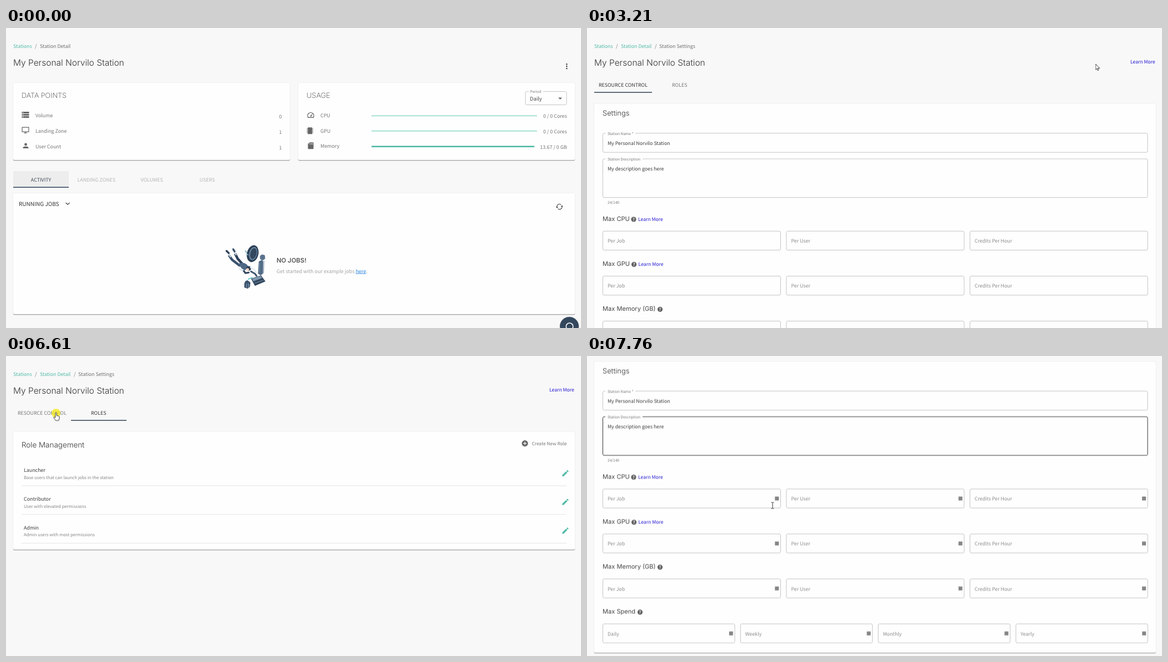
Recreate the animation shown at these times as an HTML page. Size 1035 px wide and 541 px high, loop 8 s.

```html
<!DOCTYPE html>
<html lang="en">
<head>
<meta charset="utf-8">
<title>Station settings</title>
<style>
html, body { margin: 0; width: 100%; height: 100%; overflow: hidden; background: #f8f8f8; }
svg { display: block; }
text { font-family: "Noto Sans CJK JP", "Noto Sans CJK SC", "Source Sans Pro", "Noto Sans", sans-serif; text-rendering: geometricPrecision; white-space: pre; }
text.h { font-family: Inter, "Open Sans", sans-serif; }
.box { fill: none; stroke: #c4c4c4; }
.menu rect:first-child { filter: drop-shadow(0 2px 2px rgba(0,0,0,.3)) drop-shadow(0 1px 4px rgba(0,0,0,.2)); }

#page, #detail, #crumb, #crumb3, #menu, #tools, #settings, #roles, #bar, #tabA, #tabB, #icons, #desc,
#cursor, #arrow, #hand, #beam, #click { animation: 8s step-end infinite; }
#page { animation-name: scroll; }
#detail { animation-name: detail; }
#crumb { animation-name: crumb; }
#crumb3 { animation-name: crumb3; }
#menu { animation-name: menu; }
#tools { animation-name: tools; }
#settings { animation-name: settings; }
#roles { animation-name: roles; }
#bar { animation-name: bar; }
#tabA { animation-name: tabA; }
#tabB { animation-name: tabB; }
#icons { animation-name: icons; }
#desc { animation-name: desc; }
#cursor { animation-name: cursor; }
#arrow { animation-name: arrow; }
#hand { animation-name: hand; }
#beam { animation-name: beam; }
#click { animation-name: click; }

@keyframes scroll {
  0% { transform: none; } 94.125% { transform: translateY(-14.4px); }
  95.125% { transform: translateY(-62px); } 96.06% { transform: translateY(-106px); }
  97%, 100% { transform: translateY(-126.5px); }
}
@keyframes detail { 0% { opacity: 1; } 36.75%, 100% { opacity: 0; } }
@keyframes crumb { 0% { fill: #6f6f6f; } 36.75%, 100% { fill: #52baa6; } }
@keyframes crumb3 { 0% { opacity: 0; } 36.75%, 100% { opacity: 1; } }
@keyframes menu { 0% { opacity: 0; } 20% { opacity: .5; } 21% { opacity: 1; } 36.75% { opacity: .4; } 37.625%, 100% { opacity: 0; } }
@keyframes tools { 0% { opacity: 0; } 40.125%, 100% { opacity: 1; } }
@keyframes settings { 0% { opacity: 0; } 40.125% { opacity: 1; } 64% { opacity: 0; } 84.5%, 100% { opacity: 1; } }
@keyframes roles { 0% { opacity: 0; } 64% { opacity: 1; } 84.5%, 100% { opacity: 0; } }
@keyframes bar {
  0% { transform: none; width: 104px; } 65.375% { transform: translateX(62px); width: 102px; }
  66.75% { transform: translateX(99px); width: 100px; } 68.125% { transform: translateX(104px); width: 100px; }
  85.5% { transform: translateX(42px); width: 102px; } 86.5% { transform: translateX(8px); width: 104px; }
  87.5%, 100% { transform: none; width: 104px; }
}
@keyframes tabA { 0% { fill: #333; } 64% { fill: #757575; } 84.5%, 100% { fill: #333; } }
@keyframes tabB { 0% { fill: #757575; } 64% { fill: #333; } 84.5%, 100% { fill: #757575; } }
@keyframes icons { 0% { opacity: 0; } 49.5% { opacity: 1; } 64% { opacity: 0; } 91.25%, 100% { opacity: 1; } }
@keyframes desc { 0% { stroke: #c4c4c4; } 91.3%, 100% { stroke: #333; } }
@keyframes cursor {
  0% { transform: translate(936px,560px); }
  4.5% { transform: translate(936px,528px); animation-timing-function: steps(5); }
  9.375% { transform: translate(978px,240px); animation-timing-function: steps(5); }
  14.25% { transform: translate(1003px,78px); }
  15.25% { transform: translate(1006px,72px); }
  16.25% { transform: translate(1008px,68px); }
  24.125% { transform: translate(995px,68px); }
  25.125% { transform: translate(977px,68px); }
  26% { transform: translate(945px,67px); }
  27% { transform: translate(925px,65px); }
  28% { transform: translate(915.5px,64px); }
  31.75% { transform: translate(916.5px,65.5px); }
  32.75% { transform: translate(915.5px,64.5px); }
  36.75% { transform: translate(915.5px,65px); }
  42.625% { transform: translate(913px,65px); }
  46.625% { transform: translate(911px,64.5px); }
  48.5% { transform: translate(895px,62px); animation-timing-function: steps(5); }
  53.31% { transform: translate(640px,57px); animation-timing-function: steps(5); }
  58.125% { transform: translate(272px,96px); }
  59.25% { transform: translate(240px,99px); }
  60.2% { transform: translate(205px,101px); }
  61.2% { transform: translate(183px,101px); }
  72.875% { transform: translate(181px,102px); }
  73.875% { transform: translate(180px,102px); }
  75.75% { transform: translate(175px,102px); animation-timing-function: steps(6); }
  81.625% { transform: translate(90px,102.5px); }
  87.5% { transform: translate(90px,102.5px); animation-timing-function: steps(5); }
  92.25%, 100% { transform: translate(334px,269.5px); }
}
@keyframes arrow { 0% { opacity: 0; } 4.5% { opacity: 1; } 15.25% { opacity: 0; } 36.75% { opacity: 1; } 60.2% { opacity: 0; } 88.4% { opacity: 1; } 90.3%, 100% { opacity: 0; } }
@keyframes hand { 0% { opacity: 0; } 15.25% { opacity: 1; } 36.75% { opacity: 0; } 60.2% { opacity: 1; } 88.4%, 100% { opacity: 0; } }
@keyframes beam { 0% { opacity: 0; } 90.3%, 100% { opacity: 1; } }
@keyframes click {
  0% { opacity: 0; } 18.1% { opacity: .8; } 20% { opacity: 0; } 34.875% { opacity: .8; } 36.75% { opacity: 0; }
  62.125% { opacity: .8; } 64% { opacity: 0; } 82.625% { opacity: .8; } 84.5%, 100% { opacity: 0; }
}
</style>
</head>
<body>
<svg id="stage" width="1035" height="541" viewBox="0 0 1035 541"></svg>
<script>
const TEAL = '#52baa6', NAVY = '#2f4258', GREY = '#757575', BLUE = '#2318d2';
const text = (x, y, s, size = 8.9, fill = GREY, more = '') =>
  `<text x="${x}" y="${y}" font-size="${size}" fill="${fill}" ${more}>${s}</text>`;
const head = (x, y, s, size, weight = 300, fill = '#333') =>
  text(x, y, s, size, fill, `class="h" font-weight="${weight}"`);
const right = (x, y, s, size, fill) => text(x, y, s, size, fill, 'text-anchor="end"');
const mid = (x, y, s, fill, more = '') => text(x, y, s, 8.88, fill, 'text-anchor="middle" ' + more);
const rect = (x, y, w, h, fill, more = '') =>
  `<rect x="${x}" y="${y}" width="${w}" height="${h}" fill="${fill}" ${more}/>`;
const path = (d, fill = 'none', more = '') => `<path d="${d}" fill="${fill}" ${more}/>`;
const circle = (x, y, r, fill, more = '') => `<circle cx="${x}" cy="${y}" r="${r}" fill="${fill}" ${more}/>`;
const line = (d, color, width, more = '') => path(d, 'none', `stroke="${color}" stroke-width="${width}" ${more}`);
const card = (x, y, w, h) =>
  rect(x - .6, y - .4, w + 1.2, h + 2.4, '#e9e9e9', 'rx="2.5"') +
  rect(x, y + 1, w, h + .3, '#a9a9a9', 'rx="2"') + rect(x, y, w, h, '#fefefe', 'rx="2"');
const box = (x, y, w, h, more = '') => rect(x, y, w, h, 'none', `class="box" rx="2.5" ${more}`);
const at = (x, y, s) => `<g transform="translate(${x} ${y})">${s}</g>`;

const header =
  text(13, 35.6, 'Stations', 8.84, TEAL) + text(52, 35.6, '/', 8.84) +
  text(61, 35.6, 'Station Detail', 8.84, GREY, 'id="crumb"') +
  `<g id="crumb3">${text(122, 35.6, '/', 8.84)}${text(130, 35.6, 'Station Settings', 8.84, '#6f6f6f')}</g>` +
  head(13, 68.2, 'My Personal Norvilo Station', 15.5);

// Detail page
const storage = [0, 4, 8].map(y => rect(0, y, 13, 3, '#666') + rect(1.5, y + 1, 1.3, 1.2, '#fff')).join('');
const monitor = line('M.6 .6H12.4V8.6H.6zM6.5 8.6v2M4 10.9H9', '#666', 1.2);
const person = circle(5, 2.4, 2.4, '#666') + path('M0 9.6V8.2Q1 5.9 5 5.9T10 8.2V9.6z', '#666');
const gauge = line('M-4.6 4.4A5.6 5.6 0 1 1 4.6 4.4z', '#555', 1.2) + path('M-1 1.8 3.6-2.8 1 2.4A1.3 1.3 0 0 1-1 1.8z', '#555');
const chip = line('M-6-3.5H6M-6-1.2H6M-6 1.2H6M-6 3.5H6', '#888', 1) + rect(-4, -6, 8, 12, '#666');
const sd = path('M-2-6H4.2Q5-6 5-5V5Q5 6 4 6H-4Q-5 6-5 5V-3z', '#666') + line('M-1.5-4.6v2.4M.8-4.6v2.4M3-4.6v2.4', '#fff', .9);
const refresh = line('M-4.4 1A4.4 4.4 0 0 1 2.8-3.5M4.4-1A4.4 4.4 0 0 1-2.8 3.5', '#444', 1.1) +
  path('M-6.6 .2H-2.2L-4.4 2.6zM6.6-.2H2.2L4.4-2.6z', '#444');

const floating = `<g stroke-linecap="round" stroke-linejoin="round">` +
  // seat
  `<g transform="rotate(14 444 407)"><ellipse cx="444" cy="407" rx="10.3" ry="15.4" fill="#2c3f56"/>` +
  `<ellipse cx="444.800" cy="406.500" rx="7.200" ry="12" fill="#6d879f"/>` +
  `<ellipse cx="445.200" cy="406.500" rx="5.600" ry="10" fill="#33485f"/></g>` +
  line('M431 402l2 3M434 408l1.500 1', '#7fb3c4', 1.8) +
  // chair back
  path('M457 412q3-6 9-2l.5 6-4 3-5-2z', '#5a738d') + path('M455 421l6-3 2 3-.5 22-4 3-5-3z', '#526b86') +
  line('M464.500 420l-1 22', '#8da3b6', 1.2) + line('M456.500 424l-.5 16', '#6f89a1', 1.6) +
  // legs and boots
  line('M402 411l5 7 13 10', '#3b526e', 4.5) + line('M413 408l4 8 8 9', '#2d4059', 4.5) +
  line('M401 408.500l3 4M411.500 405l2.500 4', '#dfe8ee', 2) +
  line('M397 402l4 4', NAVY, 3.4) + line('M409 399l2.500 4', '#3b526e', 3.4) +
  // body
  path('M419 425q7-4 14 1l4 5-7 6q-8-3-11-12z', '#4d6885') + path('M417 431l9 5 4 4-9-3z', '#dde7ed') +
  line('M428 438l3 4 6-1', '#31455f', 3) + circle(437, 433.5, 4, '#27374c') + circle(435, 435.5, 2.5, '#f0d4c5') +
  line('M440 432l6 3 4 5', '#dfe8ee', 2.4) + line('M441 439l7 4 3 4', '#3c5470', 3) +
  // laptop and bin
  path('M441 452l18-6 8 11-19 8z', '#33475f') + path('M443 452l15-5 3 4-16 6z', '#7d97ad') +
  line('M448 460l15-5', '#7189a0', 1.2) + line('M436 453l7-3', '#4fc6c5', 1.8) +
  path('M429 461q1-6 6-6l5 4-1 8-4 3-6-2z', '#3b526d') + line('M433 461v7M436.500 461v7', '#8aa1b5', 1.1) + `</g>`;

const points = [['Volume', 0, 28.5], ['Landing Zone', 1, 28.5], ['User Count', 1, 30.5]];
const marks = [[storage, 151], [monitor, 178.5], [person, 207.5]];
const usage = [
  ['CPU', '0 / 0 Cores', 157, 956, '#b6e6db', gauge, 548.5],
  ['GPU', '0 / 0 Cores', 185.3, 956, '#b6e6db', chip, 547.2],
  ['Memory', '13.67 / 0 GB', 212.3, 951, '#4ab8a2', sd, 548.5]
];

const detail = `<g id="detail">` +
  [65.2, 69.1, 73].map(y => circle(1009.3, y, 1.3, '#444')).join('') +
  card(13, 99, 498, 139) + head(28, 126, 'DATA POINTS', 12.7, 200) +
  points.map(([s, n, x], i) => at(x, marks[i][1], marks[i][0]) +
    text(53, 160.5 + 28 * i, s) + right(496.5, 162.7 + 28 * i, n)).join('') +
  card(526, 99, 498, 139) + head(541, 126, 'USAGE', 12.9, 200) +
  usage.map(([s, v, y, end, color, icon, x], i) => at(x, y, icon) + text(566, y + 4, s) +
    rect(658, [157, 184.5, 212.5][i], end - 658, 2.5, color) + right(1009.7, [162.3, 190, 218][i], v)).join('') +
  box(935, 114.5, 74, 24) + rect(941, 113, 26, 3, '#fefefe') +
  text(943.5, 117.4, 'Period', 6.5) + text(943, 131, 'Daily', 9.3, '#444') + path('M994 125.5h7l-3.5 3.5z', '#666') +
  rect(13, 258, 100, 29, '#ededed') + rect(13, 286.5, 100, 1.5, NAVY) +
  mid(63, 277, 'ACTIVITY', '#3d4a58') +
  [['LANDING ZONES', 162.7], ['VOLUMES', 262.4], ['USERS', 362.3]].map(([s, x]) => mid(x, 277, s, '#b5b5b5')).join('') +
  card(13, 298, 1011, 218) + text(23, 321, 'RUNNING JOBS', 10.03, '#333') +
  line('M107.5 315l3.5 3.5 3.5-3.5', '#444', 1.2) + at(996.3, 322.3, refresh) + floating +
  head(487, 423, 'NO JOBS!', 11.3, 600, '#555') +
  text(487, 441.5, 'Get started with our example jobs <tspan fill="#2a86e0" text-decoration="underline">here</tspan>.', 8.99, '#a3a3a3') +
  circle(1014, 538.5, 18.5, '#000', 'opacity=".06"') + circle(1014, 538, 17, '#33475d') +
  line('M1011 543.5a6.3 6.3 0 1 1 7 0', '#fff', 1.6) + `</g>`;

// Settings and roles
const label = (x, y, s, w) => rect(x - 4, y - 5, w, 5, '#fefefe') + text(x, y, s, 6.63);
const help = (x, y) => circle(x, y, 4.6, '#626262') + mid(x, y + 2.7, '?', '#fff', 'style="font-size:7.4px;font-weight:700"');
const rows = [['CPU', 348, 84], ['GPU', 429.3, 84.6], ['Memory (GB)', 510.3, 131.5], ['Spend', 591.4, 95.5]];
const thirds = [['Per Job', 28.5], ['Per User', 358.9], ['Credits Per Hour', 689.3]];
const quarters = [['Daily', 28.5], ['Weekly', 276.3], ['Monthly', 524.2], ['Yearly', 772]];
let fields = '', icons = '';
rows.forEach(([name, y, hx], i) => {
  const top = 366.3 + 81.1 * i, w = i < 3 ? 320 : 237.5;
  fields += head(28, y, 'Max ' + name, 11.1, 400, '#444') + help(hx, y - 3);
  if (i < 2) fields += text(hx + 8, y, 'Learn More', 8.65, BLUE);
  (i < 3 ? thirds : quarters).forEach(([s, x]) => {
    fields += box(x, top, w, 34.3) + text(x + 8.5, top + 21, s, 8.84, '#8a8a8a');
    icons += rect(x + w - 10.2, top + 13.7, 7, 7, '#858585');
  });
});

const settings = `<g id="settings">` + card(13, 136.5, 1011, 525) + head(28, 158, 'Settings', 12.9) +
  box(28.5, 189.8, 980.6, 34.4) + label(37, 192.6, 'Station Name *', 54) +
  text(37, 211, 'My Personal Norvilo Station', 8.77, '#3a3a3a') +
  box(28.5, 236, 980.6, 69.7, 'id="desc"') + label(37, 238.7, 'Station Description', 67) +
  text(37, 257, 'My description goes here', 8.77, '#3a3a3a') + text(37, 316.8, '24/140', 6.63) +
  fields + `<g id="icons">${icons}</g></g>`;

const pencil = path('M-5.5 5.5V3.2L1.3-3.6 3.6-1.3-3.2 5.5zM2-4.3 3.3-5.5Q3.8-5.8 4.2-5.5L5.5-4.2Q5.8-3.8 5.5-3.3L4.3-2z', '#4db9a5');
const roleList = [
  ['Launcher', 'Base users that can launch jobs in the station'],
  ['Contributor', 'User with elevated permissions'],
  ['Admin', 'Admin users with most permissions']
];
const roles = `<g id="roles">` + card(13, 136.5, 1011, 212.5) + head(28, 164.7, 'Role Management', 13.45) +
  circle(934, 157.6, 5.6, '#666') + line('M931 157.6h6M934 154.6v6', '#fff', 1.2) +
  right(1009.7, 161.2, 'Create New Role', 8.3) +
  roleList.map(([name, info], i) => at(0, 51.8 * i,
    text(32, 209, name, 8.9, '#3a3a3a') + text(32, 221.9, info, 7.75, '#858585') +
    rect(28, 233.5, 981, 1, '#e6e6e6') + at(1006.8, 211.5, pencil))).join('') + `</g>`;

const tools = `<g id="tools">` + text(978, 64.3, 'Learn More', 8.65, BLUE) +
  text(21, 105.6, 'RESOURCE CONTROL', 8.84, GREY, 'id="tabA"') + text(153, 105.6, 'ROLES', 8.84, GREY, 'id="tabB"') +
  rect(13, 115.3, 104, 1.5, NAVY, 'id="bar"') + `</g>`;

const gear = circle(0, 0, 3.2, 'none', 'stroke="#666" stroke-width="2"') +
  circle(0, 0, 4.7, 'none', 'stroke="#666" stroke-width="1.4" stroke-dasharray="2.46"');
const trash = path('M-3-2.7H3V4Q3 5 2 5H-2Q-3 5-3 4zM-3.8-4.4H-1.5L-1-5H1L1.5-4.4H3.8V-3.3H-3.8z', '#d32f2f');
const menu = `<g id="menu" class="menu">` + rect(891.5, 53, 138, 54.5, '#fff', 'rx="2"') +
  rect(891.5, 57.6, 138, 22.6, '#c9c9c9') + at(910.3, 69.2, gear) + text(945, 73, 'Station Settings', 8.84, '#333') +
  at(910.3, 91.6, trash) + text(945, 95.4, 'Delete Station', 8.77, '#d32f2f') + `</g>`;

const pen = 'stroke="#222" stroke-width=".9" stroke-linejoin="round"';
const cursor = `<g id="cursor">` + circle(0, .5, 8, '#f6ea20', 'id="click"') +
  path('M0 0V10.2l2.4-2.1 1.5 3.5 1.6-.7-1.5-3.4h3.2z', '#fff', pen + ' id="arrow"') +
  path('M-1.2.8a1.2 1.2 0 0 1 2.4 0V5l3.6.9q1.6.5 1.5 2.1l-.5 3.2-1 2.6H-.6L-4 9.2q-.6-1.2.4-1.5t2.4 1.2z', '#fff', pen + ' id="hand"') +
  line('M-2.5-5.5H-.8L0-4.8.8-5.5H2.5M0-4.8V4.8M-2.5 5.5H-.8L0 4.8.8 5.5H2.5', '#333', 1, 'id="beam"') + `</g>`;

document.getElementById('stage').innerHTML =
  rect(0, 0, 1035, 541, '#f8f8f8') + `<g id="page">${header}${detail}${tools}${settings}${roles}</g>` + menu + cursor;
</script>
</body>
</html>
```
